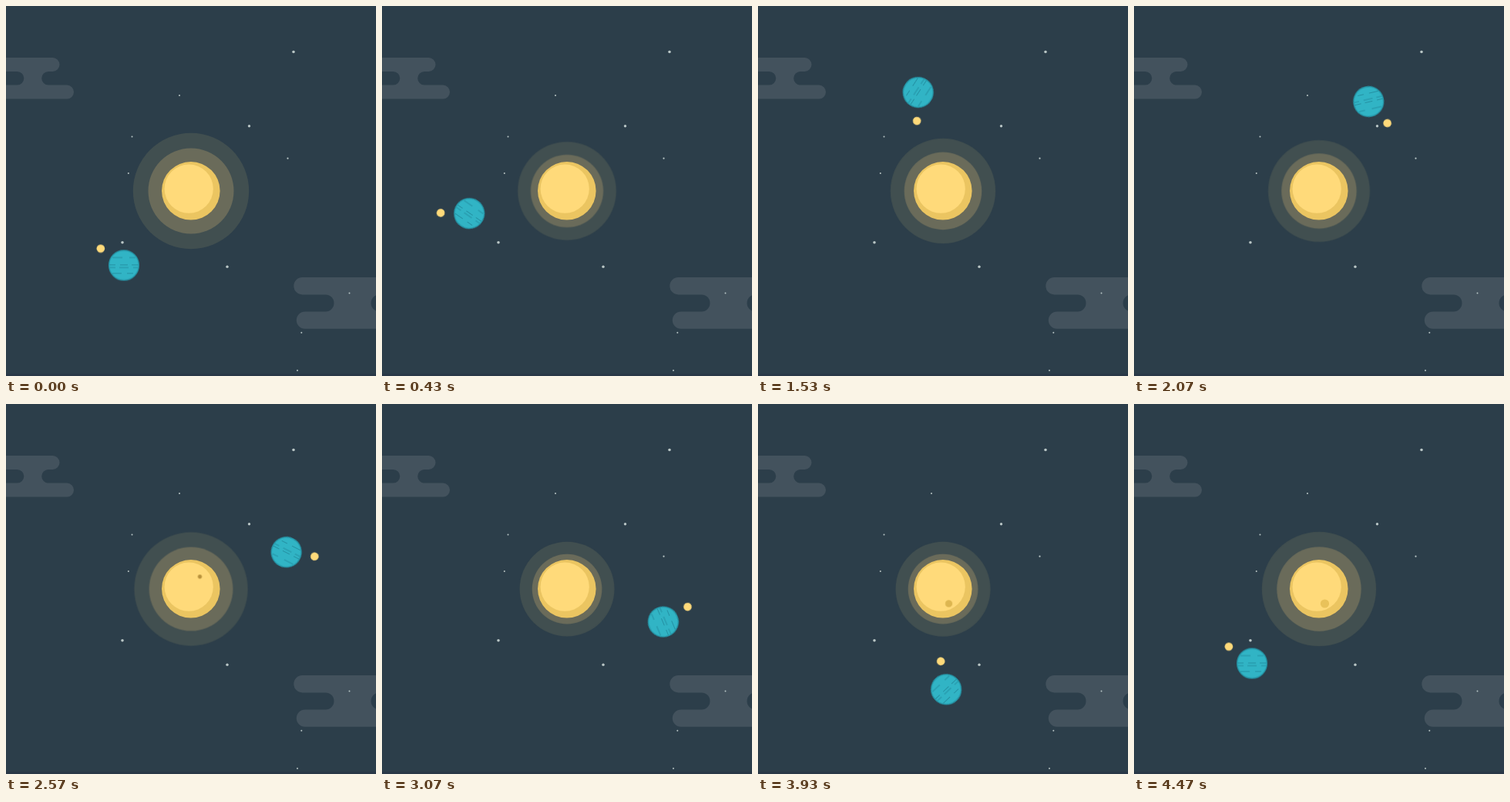
Recreate the animation shown at these times as an HTML page without scripts. Size 480 by 480 pixels, loop 4.51 s.

```html
<!DOCTYPE html>
<html lang="en">
<head>
<meta charset="utf-8">
<title>Little orbit</title>
<style>
  html, body { margin: 0; width: 100%; height: 100%; overflow: hidden; background: #2c3e4a; }
  svg { display: block; width: 100vw; height: 100vh; }

  .halo, .orbit, .moon, .meteor, .spot, .last-spot { animation: 4510ms linear infinite; }

  .orbit { transform-origin: 241px 239px; animation-name: orbit; }
  .moon { transform-origin: 0 0; animation-name: moon; }
  @keyframes orbit { 99.11%, 100% { transform: rotate(360deg); } }
  /* Twice backwards inside the orbit: once backwards on the stage. */
  @keyframes moon { 99.11%, 100% { transform: rotate(-720deg); } }

  .halo {
    transform-origin: 240px 240px;
    animation-name: pulse;
    animation-timing-function: cubic-bezier(.364, 0, .636, 1);
  }
  @keyframes pulse {
    0%, 27.16%, 54.1%, 77.38% { transform: scale(1); }
    13.3%, 40.58%, 67.63%, 87.8% { transform: scale(.816); }
    100% { transform: scale(.988); }
  }

  .meteor {
    fill: none;
    stroke: #fff;
    stroke-width: 2;
    stroke-dasharray: 56 200;
    animation-name: fall;
  }
  .meteor.late { animation-delay: -3130ms; }
  @keyframes fall {
    0%, 15.52% { stroke-dashoffset: 56; }
    22.44%, 100% { stroke-dashoffset: -100; }
  }

  .spot, .last-spot {
    transform-box: fill-box;
    transform-origin: center;
    fill: currentColor;
    stroke: currentColor;
    stroke-width: 1.2;
  }
  .spot { animation-name: bubble; }
  .spot.late { animation-delay: -2520ms; }
  @keyframes bubble {
    0%, 11.09% { transform: scale(0); color: #b8923c; }
    12.86% { transform: scale(.45); color: #b8923c; }
    16.6% { transform: scale(.85); color: #ddb651; fill-opacity: 1; }
    19.2% { transform: scale(1); color: #ebc561; fill-opacity: 0; opacity: 1; }
    21%, 100% { transform: scale(1); color: #ebc561; fill-opacity: 0; opacity: 0; }
  }
  .last-spot { animation-name: swell; }
  @keyframes swell {
    0%, 82% { transform: scale(0); color: #b8923c; }
    87.14% { transform: scale(.82); color: #ddb651; }
    99.11%, 100% { transform: scale(1); color: #e9c25a; }
  }
</style>
</head>
<body>
<svg viewBox="0 0 480 480">
  <rect width="480" height="480" fill="#2c3e4a"/>
  <rect y="477" width="480" height="3" fill="#293847"/>

  <g fill="#43525d">
    <path d="M0 67H60.5a9 9 0 0 1 0 18H55a8.8 8.8 0 0 0 0 17.6H79a9 9 0 0 1 0 18H0V102.6H14.5a8.8 8.8 0 0 0 0-17.6H0z"/>
    <path d="M500 352H384.5a11.2 11.2 0 0 0 0 22.4H414.5a11 11 0 0 1 0 22H388a11.2 11.2 0 0 0 0 22.4H500V396.4H484.5a11 11 0 0 1 0-22H500z"/>
  </g>

  <g fill="#b9c6c6">
    <circle cx="373" cy="59.5" r="1.8"/>
    <circle cx="315.5" cy="155.7" r="1.7"/>
    <circle cx="151" cy="306.8" r="1.8"/>
    <circle cx="287" cy="338.2" r="1.7"/>
    <circle cx="225" cy="116" r="1"/>
    <circle cx="163.5" cy="169.5" r="1"/>
    <circle cx="365.5" cy="197.7" r="1.1"/>
    <circle cx="158.8" cy="217" r="1"/>
    <circle cx="445.5" cy="372.5" r="1"/>
    <circle cx="383.3" cy="423.7" r="1"/>
    <circle cx="378" cy="472.7" r="1"/>
  </g>

  <path class="meteor" pathLength="100" d="M207 65L55 224"/>
  <path class="meteor late" pathLength="100" d="M423 220L271 379"/>

  <g class="halo">
    <circle cx="240" cy="240" r="75.2" fill="#414f50"/>
    <circle cx="240" cy="240" r="55.5" fill="#6a6b5a"/>
  </g>
  <circle cx="239.8" cy="239.8" r="37.8" fill="#ebc561"/>
  <circle cx="237.2" cy="237.2" r="31.6" fill="#ffda7a"/>
  <circle class="spot" cx="224" cy="243" r="5.4"/>
  <circle class="spot late" cx="251.5" cy="224" r="5.4"/>
  <circle class="last-spot" cx="247.5" cy="259" r="5"/>

  <g class="orbit">
    <g transform="translate(153.1 336.5)">
      <circle r="19.3" fill="#31b4c5" stroke="#2597a9" stroke-width="1.4"/>
      <path d="M-15-10H-2M7-10H15M-19-.5H-11M-5-.5H5M10-.5H19M-18 3H-11M-6 3H6M12 3H18M-15 10.5H-3M4 10.5H12"
        fill="none" stroke="#2491a3" stroke-width="1.2"/>
      <g class="moon"><circle cx="-30.1" cy="-21.7" r="5.3" fill="#ffda7a"/></g>
    </g>
  </g>
</svg>
</body>
</html>
```
